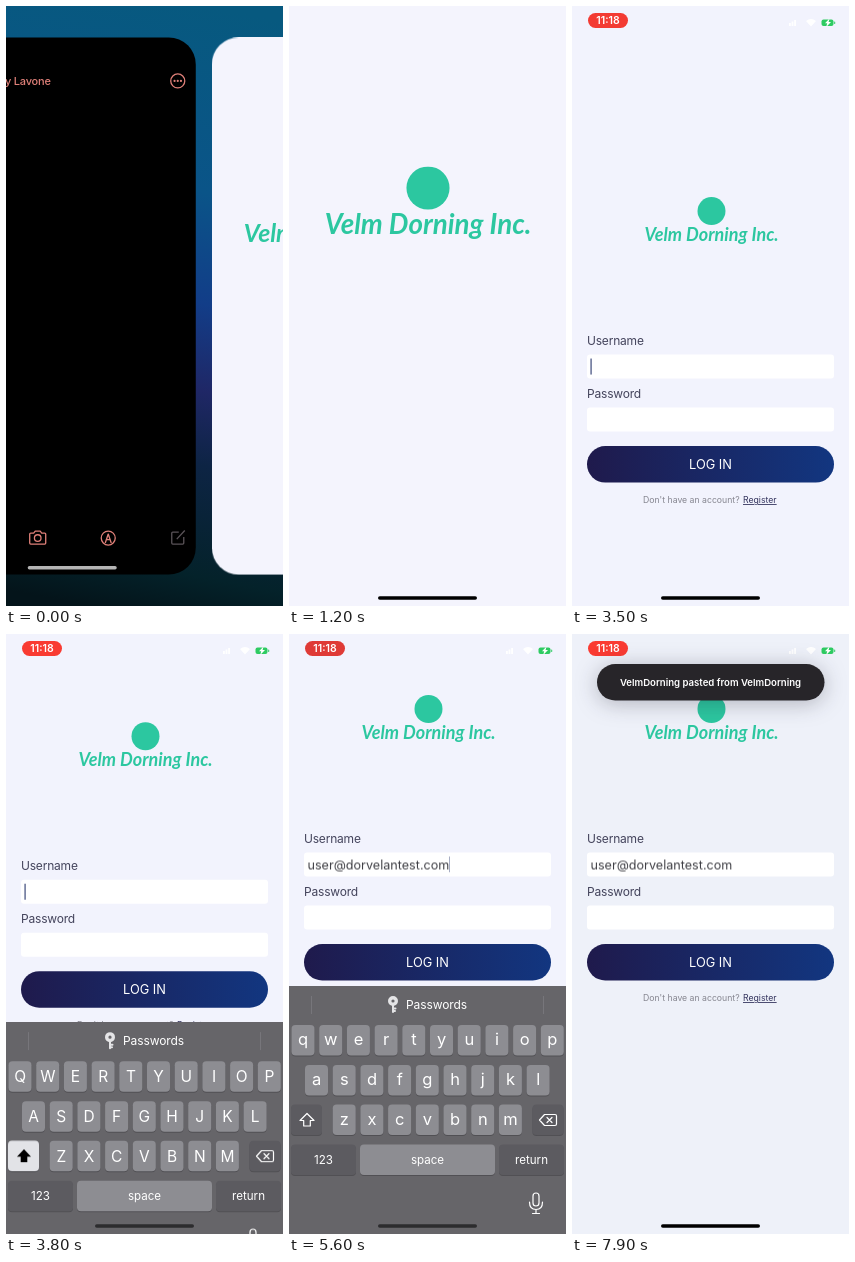
Animation, 277 px wide and 600 px high, one loop 8 s. Source, as an HTML page:

```html
<!DOCTYPE html>
<html lang="en">
<head>
<meta charset="utf-8">
<title>Login flow</title>
<style>
html, body { margin: 0; width: 100%; height: 100%; overflow: hidden; background: #000; }
svg { display: block; width: 100%; height: 100%; font-family: Inter, Roboto, sans-serif; }

.cards, .app-bg, .home, .splash, .login, .status, .form, .keyboard,
.caret, .pasted, .upper, .lower, .banner { animation: 8s linear infinite; }

/* app switcher card grows to fill the screen */
.cards { animation-name: open; }
@keyframes open {
  0% { transform: translate(206.7px, 31.5px) scale(.895); animation-timing-function: cubic-bezier(.25,.35,.6,.9); }
  3.75% { transform: translate(14.4px, 11.7px) scale(.9615); animation-timing-function: cubic-bezier(.2,.6,.4,1); }
  11.25%, 100% { transform: none; }
}
.app-bg { animation-name: app-bg; }
@keyframes app-bg {
  0%, 6% { rx: 30px; fill: #f4f4fd; }
  11.25% { rx: 0; fill: #f4f4fd; }
  20% { rx: 0; fill: #f4f4fd; }
  25%, 82.49% { rx: 0; fill: #f2f3fd; }
  82.5%, 100% { rx: 0; fill: #eef1f9; }
}
.home { animation-name: home; }
@keyframes home {
  0%, 3.75% { fill: #666; }
  11.25%, 44% { fill: #000; }
  47%, 82.49% { fill: #2c2c2e; }
  82.5%, 100% { fill: #000; }
}

.splash { animation-name: out; }
@keyframes out { 0%, 20% { opacity: 1; } 25%, 100% { opacity: 0; } }
.login, .status { animation-name: in; }
@keyframes in { 0%, 20% { opacity: 0; } 25%, 100% { opacity: 1; } }

/* recording pill pulses */
.pill { animation: pulse 2s ease-in-out -1.8s infinite alternate; }
@keyframes pulse { from { fill: #d83a37; } to { fill: #fc3b32; } }

/* keyboard rises, form makes room */
.form { animation-name: lift; }
@keyframes lift {
  0%, 43.75% { transform: none; animation-timing-function: cubic-bezier(.3,.4,.7,.85); }
  47.5% { transform: translateY(-103px); animation-timing-function: cubic-bezier(.2,.6,.4,1); }
  51.25%, 100% { transform: translateY(-130.5px); }
}
.keyboard { animation-name: rise; }
@keyframes rise {
  0%, 43.75% { transform: translateY(250px); animation-timing-function: cubic-bezier(.3,.4,.7,.85); }
  47.5% { transform: translateY(36.5px); animation-timing-function: cubic-bezier(.2,.6,.4,1); }
  51.25%, 82.49% { transform: none; }
  82.5%, 100% { transform: translateY(250px); }
}

/* typing state */
.caret { animation-name: blink; animation-timing-function: step-end; }
@keyframes blink {
  0% { opacity: 0; } 43.75% { opacity: 1; } 53.75% { opacity: 0; }
  60% { opacity: 1; } 66.25%, 100% { opacity: 0; }
}
.pasted, .lower { animation-name: show; animation-timing-function: step-end; }
@keyframes show { 0% { opacity: 0; } 70%, 100% { opacity: 1; } }
.upper { animation-name: hide; animation-timing-function: step-end; }
@keyframes hide { 0% { opacity: 1; } 70%, 100% { opacity: 0; } }
.pasted .end { animation: end 8s step-end infinite; }
@keyframes end { 0% { opacity: .6; } 82.5%, 100% { opacity: 0; } }

.banner { animation-name: drop; filter: drop-shadow(0 3px 11px rgba(20,20,40,.28)); }
@keyframes drop {
  0%, 70% { transform: translateY(-120px); animation-timing-function: cubic-bezier(.2,.7,.3,1); }
  75%, 100% { transform: none; }
}

.mid { text-anchor: middle; }
.word { font: italic 700 18px Lato, sans-serif; fill: #2cc7a0; text-anchor: middle; }
.label { font-size: 12px; letter-spacing: -.2px; fill: #44445c; }
.small { font-size: 8.7px; }
.line { fill: none; stroke: #fff; stroke-width: 1.2; stroke-linecap: round; stroke-linejoin: round; }
.rose { fill: none; stroke: #e08079; stroke-width: 1.3; stroke-linejoin: round; }
.light { fill: #8d8d92; }
.dark { fill: #5c5b60; }
.edge { fill: #515054; }
.cap { fill: #fff; text-anchor: middle; font-size: 15.5px; }
.lower .cap { font-size: 16.5px; }
.wide { fill: #fff; text-anchor: middle; font-size: 11.6px; }
</style>
</head>
<body>
<svg viewBox="0 0 277 600" preserveAspectRatio="none">
  <defs>
    <linearGradient id="wall" gradientUnits="userSpaceOnUse" x1="200" y1="0" x2="85" y2="600">
      <stop offset="0" stop-color="#07597f"/>
      <stop offset=".3" stop-color="#0a5488"/>
      <stop offset=".48" stop-color="#123d88"/>
      <stop offset=".62" stop-color="#1f2766"/>
      <stop offset=".74" stop-color="#0d2444"/>
      <stop offset=".92" stop-color="#04222a"/>
      <stop offset="1" stop-color="#04141a"/>
    </linearGradient>
    <linearGradient id="btn">
      <stop offset="0" stop-color="#1f1a4c"/>
      <stop offset="1" stop-color="#123680"/>
    </linearGradient>
    <g id="brand">
      <circle r="14" fill="#2cc7a0"/>
      <text class="word" y="30">Velm Dorning Inc.</text>
    </g>
  </defs>

  <rect width="277" height="600" fill="url(#wall)"/>

  <g class="cards">
    <!-- notes card -->
    <g transform="translate(-295 0) scale(1.1173) translate(58 -31.5)">
      <rect x="-58" y="31.5" width="248" height="537" rx="27"/>
      <text x="45" y="79" text-anchor="end" font-size="11" font-weight="500" letter-spacing="-.2" fill="#e08079">My Lavone</text>
      <circle class="rose" cx="172" cy="75" r="7"/>
      <g fill="#e08079">
        <circle cx="168.8" cy="75" r="1.1"/><circle cx="172" cy="75" r="1.1"/><circle cx="175.2" cy="75" r="1.1"/>
      </g>
      <path class="rose" d="M25 527h3l1.5-2h5l1.5 2h3q1 0 1 1v9q0 1-1 1h-14q-1 0-1-1v-9q0-1 1-1z"/>
      <circle class="rose" cx="32" cy="532" r="3.3"/>
      <circle class="rose" cx="102.5" cy="532" r="7"/>
      <path class="rose" d="M99.5 537l3-9 3 9M101 533.5h3"/>
      <path class="rose" style="stroke:#5a5358" d="M173 526h-6q-1 0-1 1v10q0 1 1 1h10q1 0 1-1v-6M171 533l8-8.5"/>
      <rect x="22" y="560" width="89" height="3.4" rx="1.7" fill="#b4b4b4"/>
    </g>

    <!-- app -->
    <rect class="app-bg" width="277" height="600"/>
    <use class="splash" href="#brand" transform="translate(139 182) scale(1.54)"/>

    <g class="login">
      <g class="form">
        <use href="#brand" transform="translate(139.5 205.5)"/>
        <text class="label" x="15" y="339">Username</text>
        <rect x="15" y="349" width="247" height="24" rx="3" fill="#fff"/>
        <rect class="caret" x="18.3" y="353" width="1.6" height="16" fill="#6d779c"/>
        <g class="pasted">
          <text x="18.5" y="365.5" font-size="12.6" fill="#404046">user@dorvelantest.com</text>
          <rect class="end" x="160" y="353" width="1" height="16" fill="#6d779c"/>
        </g>
        <text class="label" x="15" y="392.5">Password</text>
        <rect x="15" y="402" width="247" height="24" rx="3" fill="#fff"/>
        <rect x="15" y="440.5" width="247" height="36.5" rx="18.25" fill="url(#btn)"/>
        <text class="mid" x="138.5" y="463.3" font-size="12.8" fill="#fff">LOG IN</text>
        <text class="small" x="71" y="497.5" fill="#85858f">Don't have an account?</text>
        <text class="small" x="171" y="497.5" fill="#34345e" text-decoration="underline">Register</text>
      </g>
    </g>
  </g>

  <g class="status">
    <rect class="pill" x="16" y="7" width="40" height="15" rx="7.5"/>
    <text class="mid" x="36" y="18.3" font-size="10.5" font-weight="600" fill="#fff">11:18</text>
    <path fill="#fff" d="M217 20v-3h1.8v3zM219.6 20v-4.5h1.8v4.5zM222.2 20v-6h1.8v6zM234 15q5-4 10 0l-5 5.5z"/>
    <rect x="249.5" y="13.5" width="12" height="6.5" rx="2" fill="#2ecb62"/>
    <path fill="#fff" d="M257.5 12.5l-4.5 4.8h2.2l-1 3.7 4.8-5h-2.4z"/>
    <rect x="262.2" y="15.5" width="1" height="2.6" rx=".5" fill="#2ecb62"/>
  </g>

  <g class="keyboard">
    <rect y="352" width="277" height="250" fill="#666569"/>
    <path d="M22.5 362v18M254.5 362v18" stroke="#77767b"/>
    <g fill="none" stroke="#e4e4e6" stroke-linecap="round">
      <circle cx="104" cy="367" r="3.3" stroke-width="3.4"/>
      <path d="M104 371v7M105 374.5h1.5M105 377h1" stroke-width="2"/>
    </g>
    <text x="117" y="375" font-size="12" letter-spacing="-.1" fill="#fff">Passwords</text>
    <g id="keys"></g>
    <g class="upper">
      <rect x="2" y="470.5" width="31" height="30.5" rx="4" fill="#e2e3e7"/>
      <path d="M18 479l7 7.5h-3.7v5.5h-6.6v-5.5h-3.7z"/>
    </g>
    <path class="line lower" d="M18 479.5l7 7h-3.7v5.5h-6.6v-5.5h-3.7z"/>
    <path class="line" d="M255.5 480.5h10.5q1.5 0 1.5 1.5v8q0 1.5-1.5 1.5h-10.5l-5-5.5zM258 483.5l5 5M263 483.5l-5 5"/>
    <g class="line">
      <rect x="244" y="559" width="6" height="13" rx="3"/>
      <path d="M240.5 568q0 7.5 6.5 7.5t6.5-7.5M247 575.5v4M243.5 579.5h7"/>
    </g>
  </g>

  <g class="cards">
    <rect class="home" x="89" y="590.3" width="99" height="3.5" rx="1.75"/>
  </g>

  <g class="banner">
    <rect x="25" y="30" width="227.5" height="36.5" rx="18.25" fill="#272529"/>
    <text class="mid" x="138.5" y="51.5" font-size="9.6" font-weight="600" fill="#fff">VelmDorning pasted from VelmDorning</text>
  </g>
</svg>
<script>
const rows = [["qwertyuiop", 2.5, 391], ["asdfghjkl", 16, 431], ["zxcvbnm", 43.7, 470.5]];
const pitch = 27.7;

const key = (x, y, w, tone) =>
  `<rect class="edge" x="${x}" y="${y + 1}" width="${w}" height="30.5" rx="4"/>` +
  `<rect class="${tone}" x="${x}" y="${y}" width="${w}" height="30.5" rx="4"/>`;

const caps = (shift, dy) => rows.map(([letters, x, y]) =>
  [...letters].map((c, i) =>
    `<text class="cap" x="${x + i * pitch + 11.6}" y="${y + dy}">${shift ? c.toUpperCase() : c}</text>`
  ).join("")).join("");

const wide = (x, w, tone, label) =>
  key(x, 510.5, w, tone) + `<text class="wide" x="${x + w / 2}" y="529.8">${label}</text>`;

document.getElementById("keys").innerHTML =
  rows.map(([letters, x, y]) =>
    [...letters].map((c, i) => key(x + i * pitch, y, 23, "light")).join("")).join("") +
  key(2, 470.5, 31, "dark") + key(243.5, 470.5, 31, "dark") +
  wide(2, 65, "dark", "123") + wide(71, 135, "light", "space") + wide(210, 65, "dark", "return") +
  `<g class="upper">${caps(true, 21)}</g><g class="lower">${caps(false, 20)}</g>`;
</script>
</body>
</html>
```
